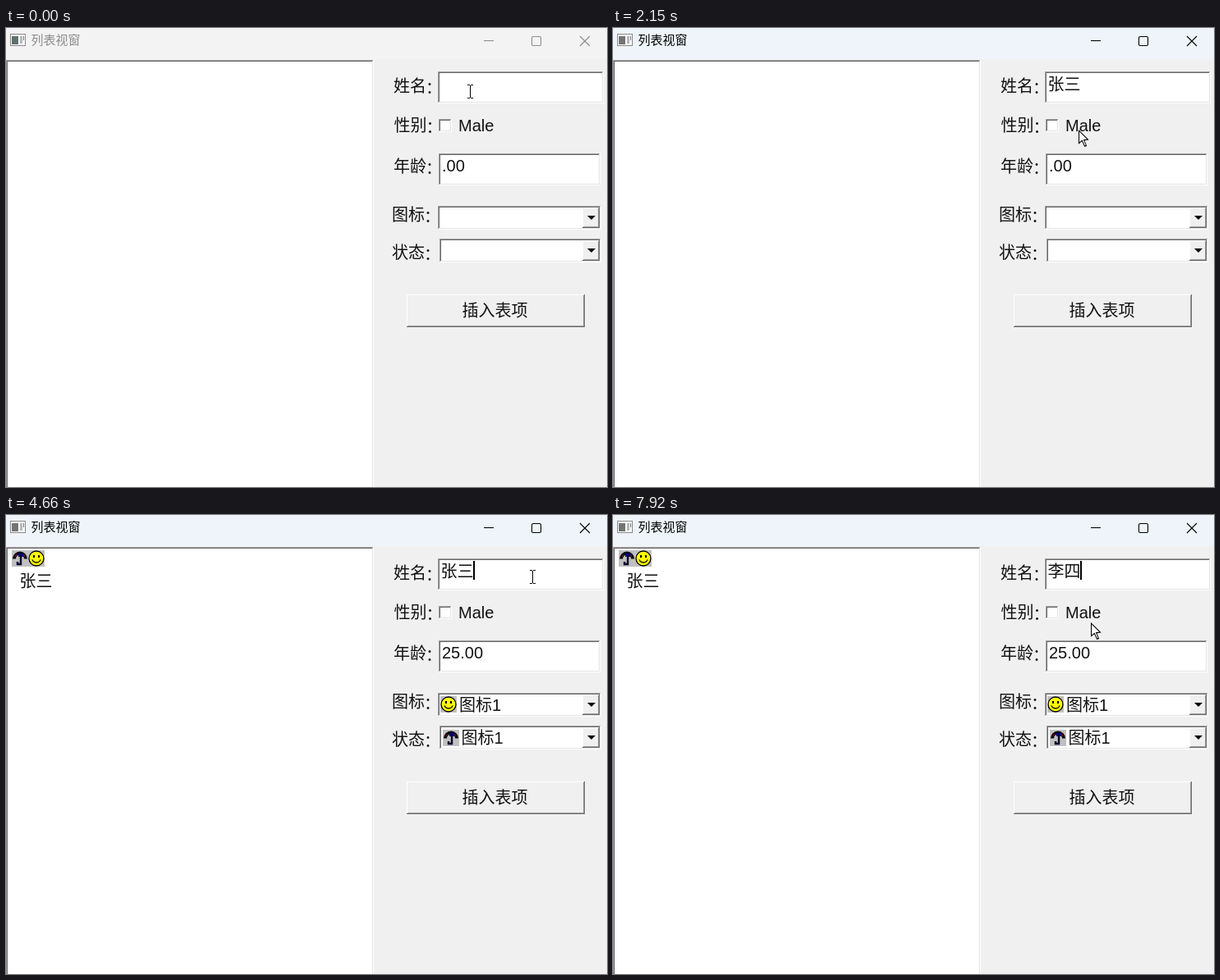
Recreate the animation shown at these times as an HTML page with a canvas. Size 732 px wide and 560 px high, loop 7.99 s.

```html
<!DOCTYPE html>
<html lang="zh-CN">
<head>
<meta charset="utf-8">
<style>
html, body { margin: 0; width: 100%; height: 100%; overflow: hidden; background: #f0f0f0; }
canvas { display: block; }
</style>
</head>
<body>
<canvas id="stage" width="732" height="560"></canvas>
<script>
const LOOP = 7990;
const g = document.getElementById('stage').getContext('2d');
const FONT = '"Liberation Sans", "Noto Sans CJK SC", "Noto Sans CJK", sans-serif';

// time, x, y
const path = [
  [0, 565, 77], [1230, 565, 77], [1290, 564, 79], [1820, 564, 79], [2550, 570, 185],
  [3320, 586, 330], [3450, 586, 330], [3640, 587, 343], [3780, 587, 343],
  [4140, 567, 425], [4199, 567, 425], [4200, 638, 73], [4480, 638, 73], [4660, 641, 75],
  [6130, 641, 75], [6390, 640, 74], [6849, 640, 74], [6850, 641, 75], [7380, 641, 75],
  [7780, 590, 136], [7920, 582, 131]
];
const clicks = [[70, 410], [3580, 3780], [4260, 4600]];

// time, text, caret shown, input candidates
const names = [
  [0, '', 0], [140, '', 1],
  ...[['z', '在 中 这'], ['zh', '这 中 之'], ['zha', '扎 炸 渣'], ['zhan', '站 占 战'],
    ['zhang', '张 长 章'], ["zhang's", '张三 丈 章'], ["zhang'sa", '张三 张 章'],
    ["zhang'san", '张三 张 章']].map(([s, c], i) => [670 + i * 77.5, s, 1, c]),
  [1290, '张三', 1], [1820, '张三', 0],
  [4260, '张三', 1], [4940, '张三', 0], [5070, '张', 1], [5600, '张', 0], [5800, '', 1],
  [6130, 'l', 1, '了 来 里'], [6200, "l's", 1, '历史 老师 类似'],
  [6330, "l'si", 1, '李四 类似 历史'], [6390, "l'si", 0, '李四 类似 历史'],
  [6650, "l'si", 1, '李四 类似 历史'],
  [6850, '李四', 1], [7380, '李四', 0], [7910, '李四', 1]
];

function rect(x, y, w, h, color) {
  g.fillStyle = color;
  g.fillRect(x, y, w, h);
}

function text(s, x, y, size = 20, color = '#111') {
  g.font = `300 ${size}px ${FONT}`;
  g.fillStyle = color;
  g.fillText(s, x, y);
}

function label(s, x, y) {
  text(s, x, y);
  text('：', x + 39, y + 1.5);
}

function round(x, y, w, h, r, color) {
  g.fillStyle = color;
  g.beginPath();
  g.roundRect(x, y, w, h, r);
  g.fill();
}

function shape(points, color) {
  g.fillStyle = color;
  g.beginPath();
  for (let i = 0; i < points.length; i += 2) g.lineTo(points[i], points[i + 1]);
  g.closePath();
  g.fill();
}

function line(...p) {
  g.beginPath();
  g.moveTo(p[0], p[1]);
  for (let i = 2; i < p.length; i += 2) g.lineTo(p[i], p[i + 1]);
  g.stroke();
}

function arc(x, y, r, from, to, color, width) {
  g.strokeStyle = color;
  g.lineWidth = width;
  g.beginPath();
  g.arc(x, y, r, from, to);
  g.stroke();
}

// Two-pixel bevel: outer and inner colours of the top-left and bottom-right edges
function bevel(x, y, w, h, fill, sunken) {
  const [a, b, c, d] = sunken
    ? ['#a0a0a0', '#696969', '#fff', '#e3e3e3']
    : ['#fff', '#f0f0f0', '#696969', '#a0a0a0'];
  rect(x, y, w, h, c);
  rect(x, y, w - 1, h - 1, a);
  rect(x + 1, y + 1, w - 2, h - 2, d);
  rect(x + 1, y + 1, w - 3, h - 3, b);
  rect(x + 2, y + 2, w - 4, h - 4, fill);
}

function combo(x, y) {
  bevel(x, y, 725 - x, 29, '#fff', true);
  bevel(702, y + 2, 21, 25, '#f0f0f0', false);
  shape([708, y + 12, 718, y + 12, 713, y + 17], '#000');
}

function smiley(x, y) {
  rect(x, y, 20, 20, '#c0c0c0');
  g.fillStyle = '#ff0';
  g.beginPath();
  g.arc(x + 10, y + 10, 9, 0, 7);
  g.fill();
  arc(x + 10, y + 10, 9, 0, 7, '#000', 1.3);
  rect(x + 6, y + 6, 2, 3, '#000');
  rect(x + 12, y + 6, 2, 3, '#000');
  arc(x + 10, y + 9.5, 5.5, 0.35, Math.PI - 0.35, '#000', 1.3);
}

function umbrella(x, y) {
  rect(x, y, 20, 20, '#c0c0c0');
  arc(x + 10, y + 10.5, 7, Math.PI, 2 * Math.PI, '#080810', 4);
  arc(x + 10, y + 10.5, 6.5, 3.5, 4.1, '#800010', 1.3);
  arc(x + 10, y + 10.5, 6.5, 5.3, 5.9, '#800010', 1.3);
  rect(x + 8, y + 4, 6, 4, '#000080');
  g.strokeStyle = '#000028';
  g.lineWidth = 2.4;
  line(x + 11, y + 6, x + 11, y + 17, x + 7, y + 17, x + 7, y + 14);
}

function titleBar(active) {
  const ink = active ? '#000' : '#8c8c8c';
  rect(0, 0, 732, 38, active ? '#eef4f9' : '#f3f3f3');
  rect(5, 7, 19, 15, '#888');
  rect(6, 8, 17, 13, '#fff');
  rect(7, 10, 8, 10, active ? '#747474' : '#607070');
  rect(17, 10, 3, 9, '#b8b8b8');
  rect(21, 10, 1, 5, '#777');
  text('列表视窗', 30.5, 20, 15, ink);
  g.strokeStyle = ink;
  g.lineWidth = 1.1;
  line(582, 15.5, 594, 15.5);
  line(699, 10, 711, 22);
  line(711, 10, 699, 22);
  g.beginPath();
  g.roundRect(640.5, 10.5, 11, 11, 1.5);
  g.stroke();
}

function candidates(list) {
  g.save();
  g.shadowColor = 'rgba(0,0,0,.22)';
  g.shadowBlur = 10;
  g.shadowOffsetY = 4;
  round(531, 81, 240, 43, 7, '#f9f9f9');
  g.restore();
  let x = 537;
  list.split(' ').forEach((word, i) => {
    const w = 42 + 18 * word.length;
    if (!i) {
      round(x, 87, w, 33, 4, '#f0f0f0');
      round(x, 94, 4, 19, 2, '#0067c0');
    }
    text(i + 1, x + 14, 111, 18, '#5c5c5c');
    text(word, x + 30, 111, 18, '#1a1a1a');
    x += w + 5;
  });
}

function nameField([, value, caret, list]) {
  text(value, 529.5, list ? 75 : 76);
  const end = 529.5 + g.measureText(value).width;
  if (list) {
    for (let x = 530; x < end; x += 3) rect(x, 79, 2, 1, '#222');
    candidates(list);
  }
  if (caret) rect(Math.round(end), 56, list ? 3 : 2, list ? 25 : 23, '#000');
}

function pointerAt(t) {
  const i = path.findIndex(p => p[0] > t);
  if (i < 0) return path[path.length - 1].slice(1);
  const [t0, x0, y0] = path[i - 1], [t1, x1, y1] = path[i];
  const k = (1 - Math.cos(Math.PI * (t - t0) / (t1 - t0))) / 2;
  return [x0 + (x1 - x0) * k, y0 + (y1 - y0) * k];
}

function pointer(x, y, composing) {
  const overEdit = x > 527 && (y > 52 && y < 92 || y > 152 && y < 192);
  g.save();
  g.translate(Math.round(x), Math.round(y));
  if (overEdit && !composing) {
    rect(0, -7, 1, 15, '#000');
    for (const end of [-8, 8]) {
      rect(-3, end, 3, 1, '#000');
      rect(1, end, 3, 1, '#000');
    }
  } else {
    g.scale(1.05, 1.05);
    shape([0, 0, 0, 17, 4, 13.5, 7, 20, 9.7, 19, 7, 12.5, 12, 12], '#000');
    shape([1, 2.4, 1, 14.8, 4.3, 11.8, 7.4, 18.6, 8.4, 18.2, 5.5, 11.5, 9.8, 11.2], '#fff');
  }
  g.restore();
}

function draw(t) {
  const field = names.findLast(n => n[0] <= t);
  const filled = t >= 2200;
  const pressed = t >= 3580 && t < 3780;
  const focusLeft = t >= 2200 && t < 4260;

  rect(0, 0, 732, 560, '#f0f0f0');
  titleBar(t >= 140);

  bevel(0, 39, 448, 540, '#fff', true);
  if (t >= 3780) {
    umbrella(7, 43);
    smiley(27, 43);
    text('张三', 16.5, 87.5);
  }

  label('姓名', 472, 78);
  label('性别', 472.5, 126);
  label('年龄', 472, 176);
  label('图标', 470, 235);
  label('状态', 470, 281);

  bevel(526, 53, 202, 39, '#fff', true);
  bevel(527, 111, 16, 16, '#fff', true);
  text('Male', 551, 126);
  bevel(527, 153, 197, 39, '#fff', true);
  text(filled ? '25.00' : '.00', 531, 175);

  combo(526, 217);
  combo(528, 257);
  if (filled) {
    smiley(529, 221);
    text('图标1', 552, 239);
    umbrella(532, 262);
    text('图标1', 554.5, 279);
  }

  bevel(488, 325, 217, 40, '#f0f0f0', pressed);
  text('插入表项', 555.5 + pressed, 352 + pressed);

  nameField(focusLeft ? [0, '张三', 0] : field);

  const [x, y] = pointerAt(t);
  if (clicks.some(([a, b]) => t >= a && t < b)) {
    g.fillStyle = 'rgba(252,248,80,.76)';
    g.beginPath();
    g.arc(x, y, 15.5, 0, 7);
    g.fill();
  }
  // The pointer hides while characters are erased
  if (t < 5070 || t >= 6130) pointer(x, y, !!field[3]);
}

function tick(now) {
  draw(now % LOOP);
  requestAnimationFrame(tick);
}
requestAnimationFrame(tick);
</script>
</body>
</html>
```
